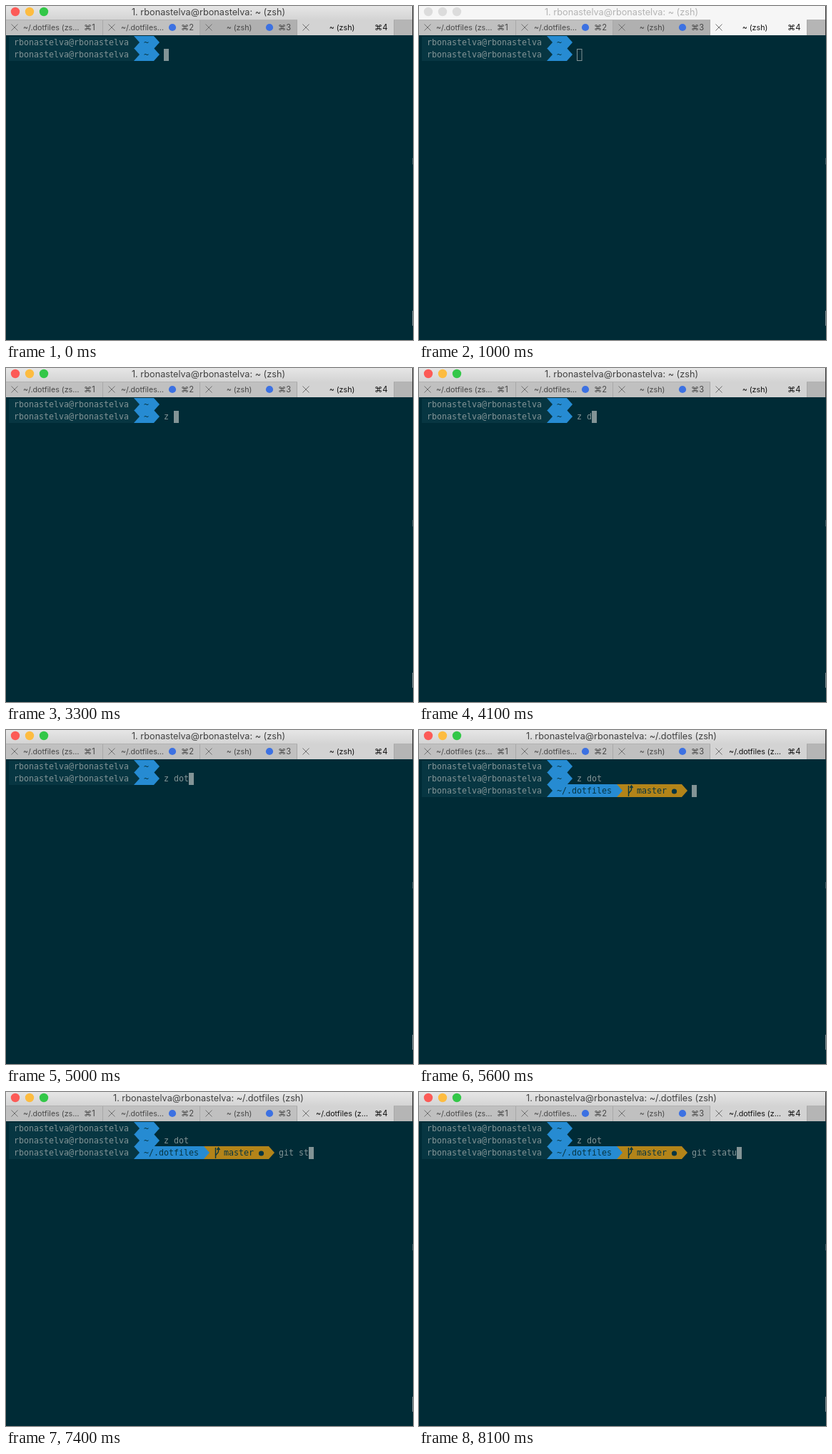
Write an HTML page that moves like this. It is 570x468 px and loops after 8.2 s.

```html
<!DOCTYPE html>
<html lang="en">
<head>
<meta charset="utf-8">
<title>Terminal</title>
<style>
  html, body { margin: 0; width: 100%; height: 100%; overflow: hidden; background: #002b36; }
  svg { display: block; }
  text { white-space: pre; }
  .title { font: 12.7px Inter, sans-serif; text-anchor: middle; }
  .tab { font: 10.7px Inter, sans-serif; }
  .mid { text-anchor: middle; }
  .key { font: 11.2px Inter, sans-serif; }
  .mono { font: 11.63px "DejaVu Sans Mono", monospace; }
</style>
</head>
<body>
<svg id="stage" width="570" height="468" viewBox="0 0 570 468"></svg>
<script>
const LOOP = 8200, BLUR = 1000, FOCUS = 1700, ENTER = 5300;
const CELL = 7, LEFT = 4, TOP = 43, ROW = 17;
const USER = 'rbonastelva';
const GREY = '#839496', DARK = '#073642', BLUE = '#268bd2', GOLD = '#b38419';
const FIRST = [2700, 3000, 3900, 4200, 4500];
const SECOND = [6600, 6800, 6900, 7100, 7300, 7400, 7600, 7800, 8000];

const stage = document.getElementById('stage');
const rect = (x, y, w, h, fill) => `<rect x="${x}" y="${y}" width="${w}" height="${h}" fill="${fill}"/>`;
const dot = (x, y, r, fill) => `<circle cx="${x}" cy="${y}" r="${r}" fill="${fill}"/>`;
const text = (x, y, str, cls, fill) => `<text x="${x}" y="${y}" class="${cls}" fill="${fill}">${str}</text>`;
const col = n => LEFT + n * CELL;
const typed = (str, times, t) => str.slice(0, times.filter(k => k <= t).length);
const mono = (c, row, str, fill) => text(col(c), TOP + row * ROW + 12, str, 'mono', fill);

// Powerline segment between two columns; its glyphs rise 1px above the row
function segment(from, to, row, fill) {
  const y = TOP + row * ROW - 1, a = col(from), b = col(to);
  return `<path fill="${fill}" d="M${a} ${y}H${b}l8 9l-8 9H${a}z"/>`;
}

function prompt(row, path) {
  const end = 28 + path.length;
  return rect(LEFT, TOP + row * ROW, col(25) - LEFT, ROW, DARK) +
    segment(25, end, row, BLUE) + segment(24, 25, row, DARK) +
    mono(1, row, `${USER}@${USER}`, GREY) + mono(27, row, path, DARK);
}

function gitPrompt(row) {
  const y = TOP + row * ROW;
  return segment(39, 52, row, GOLD) + prompt(row, '~/.dotfiles') +
    `<path d="M293.5 ${y + 1}v15m0-3c0-4 4-3 4-7v-3m-2 1l2-3l2 3" fill="none" stroke="${DARK}" stroke-width="1.4"/>` +
    mono(43, row, 'master', DARK) + dot(357.5, y + 9, 3.6, DARK);
}

function cursor(c, row, active) {
  const x = col(c), y = TOP + row * ROW;
  return active ? rect(x, y, CELL, ROW, GREY)
    : `<rect x="${x + .5}" y="${y + .5}" width="6.5" height="16" fill="none" stroke="${GREY}"/>`;
}

function tab(i, label, active, hover, busy) {
  const x = i * 136, on = i === 3;
  const fill = on ? (active ? '#d3d3d3' : '#f5f5f5') : hover ? '#b0b0b0' : '#c0c0c0';
  const ink = on ? '#111' : '#484848';
  const name = i < 2 ? text(x + (i ? 25 : 24), 34, label, 'tab', ink)
    : text(on ? 470.5 : 326.5, 34, label, 'tab mid', ink);
  return rect(x, 20, on ? 135 : 136, 21, fill) + rect(x + 135, 20, 1, 21, '#a8a8a8') +
    `<path d="M${x + 7.5} 25.5l9 9m0-9l-9 9" stroke="#707070"/>` + name +
    (busy ? dot(x + 97, 30, 5.1, '#3c71e2') : '') +
    text(x + (on ? 108 : 109), 34, '⌘' + (i + 1), 'key', ink);
}

function chrome(t, active, moved) {
  const home = '~ (zsh)';
  const lights = active ? ['#fc5b57', '#fdbc40', '#33c748'] : ['#dcdcdc', '#dcdcdc', '#dcdcdc'];
  return `<linearGradient id="bar" x2="0" y2="1"><stop stop-color="#e6e6e6"/><stop offset="1" stop-color="#d3d3d3"/></linearGradient>` +
    rect(0, 0, 569, 20, active ? 'url(#bar)' : '#f6f6f6') +
    rect(0, 19, 408, 1, '#b2b2b2') + rect(543, 19, 26, 1, '#b2b2b2') +
    lights.map((c, i) => dot(13 + 20 * i, 8, 6.2, c)).join('') +
    text(283.5, 13, `1. ${USER}@${USER}: ${moved ? '~/.dotfiles (zsh)' : home}`, 'title', active ? '#414141' : '#b4b4b4') +
    rect(543, 20, 26, 21, '#b5b5b5') +
    tab(0, '~/.dotfiles (zs…', active) +
    tab(1, '~/.dotfiles…', active, false, true) +
    tab(2, home, active, t < FOCUS, true) +
    tab(3, moved ? '~/.dotfiles (z…' : home, active) +
    rect(569, 0, 1, 41, '#333');
}

function scene(t) {
  const active = t < BLUR || t >= FOCUS, moved = t >= ENTER;
  const first = typed('z dot', FIRST, t), second = typed('git statu', SECOND, t);
  return rect(0, 0, 570, 468, '#002b36') + chrome(t, active, moved) +
    prompt(0, '~') + prompt(1, '~') + mono(31, 1, first, GREY) +
    (moved ? gitPrompt(2) + mono(54, 2, second, GREY) + cursor(54 + second.length, 2, true)
      : cursor(31 + first.length, 1, active)) +
    rect(569, 213, 1, 9, '#3c5a62') + rect(569, 427, 1, 21, '#7f8f93');
}

let shown = '';
const start = performance.now();
function draw() {
  const next = scene((performance.now() - start) % LOOP);
  if (next !== shown) stage.innerHTML = shown = next;
  requestAnimationFrame(draw);
}
draw();
</script>
</body>
</html>
```
